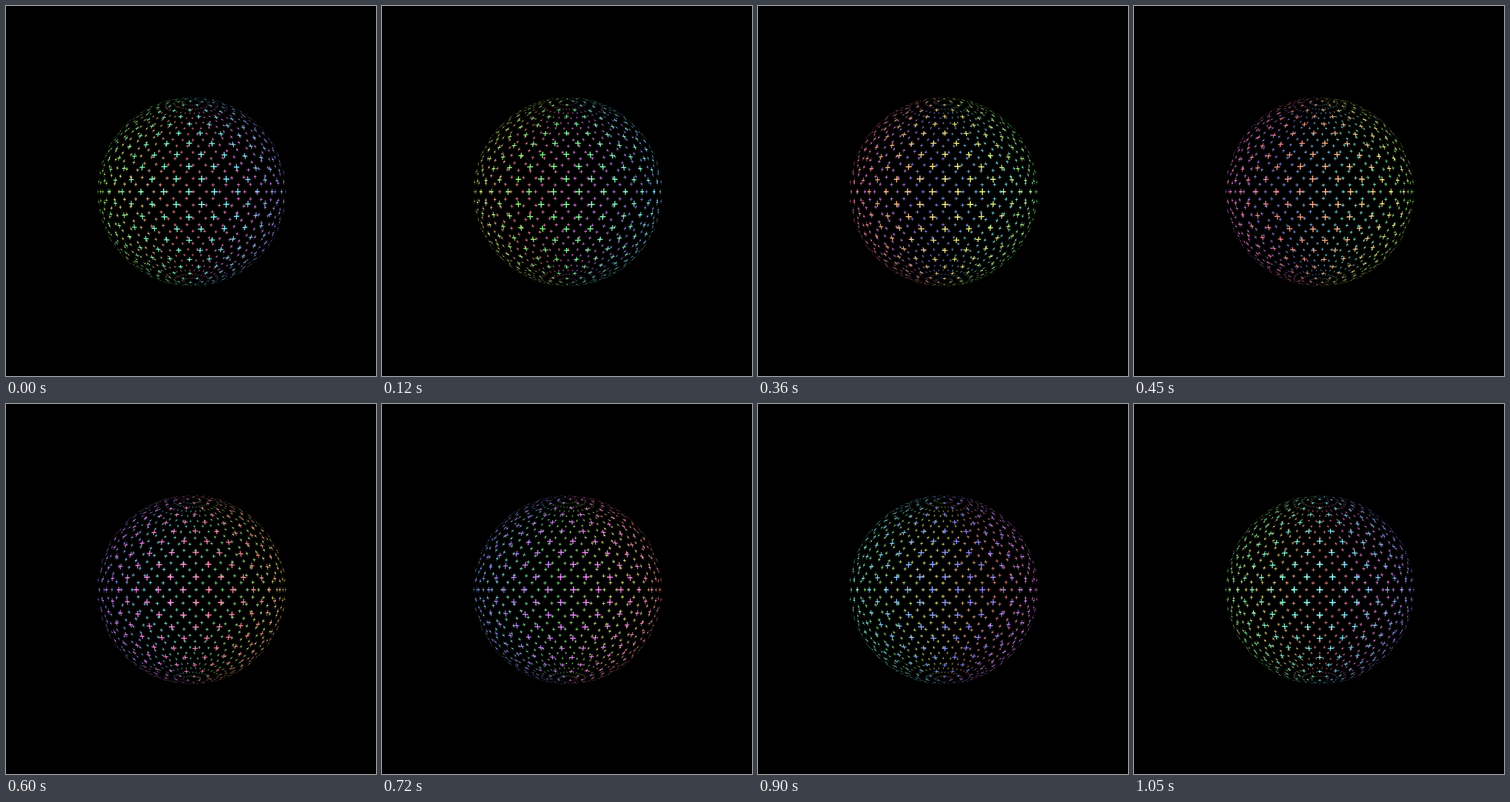
These frames come from a looping animation (500x500 px, 1080 ms). An HTML page with a canvas:

```html
<!DOCTYPE html>
<html lang="en">
<head>
<meta charset="utf-8">
<title>Sphere of crosses</title>
<style>
  html, body { margin: 0; width: 100%; height: 100%; overflow: hidden; background: #000; }
  canvas { display: block; width: 500px; height: 500px; }
</style>
</head>
<body>
<canvas id="stage" width="500" height="500"></canvas>
<script>
const ctx = document.getElementById('stage').getContext('2d');

const STEP_MS = 30, STEPS = 36;
const CENTER = 251;
const FOCAL = 379.5, DISTANCE = 3.137;   // camera, in units of the sphere radius
const COLUMNS = 32, TOP_ROW = 15;
const GAP = 2 * Math.PI / COLUMNS;       // longitude between crosses in a row
const ARM = 0.0255, HALF = 0.0043;       // arm length and half thickness, radians

// Outline of a plus sign as [longitude, latitude] offsets
const PLUS = [
  [-HALF, -ARM], [HALF, -ARM], [HALF, -HALF], [ARM, -HALF],
  [ARM, HALF], [HALF, HALF], [HALF, ARM], [-HALF, ARM],
  [-HALF, HALF], [-ARM, HALF], [-ARM, -HALF], [-HALF, -HALF]
];

function project(lon, lat) {
  const ring = Math.cos(lat);
  const scale = FOCAL / (DISTANCE - ring * Math.cos(lon));
  return [CENTER + scale * ring * Math.sin(lon), CENTER + scale * Math.sin(lat)];
}

function drawCross(lon, lat, hue) {
  ctx.fillStyle = `hsl(${hue}, 100%, 77%)`;
  ctx.beginPath();
  for (const [dLon, dLat] of PLUS) ctx.lineTo(...project(lon + dLon, lat + dLat));
  ctx.closePath();
  ctx.fill();
}

function draw(step) {
  ctx.fillStyle = '#000';
  ctx.fillRect(0, 0, 500, 500);
  const turn = (step + 1) / 9;           // columns moved to the left
  const frontHue = 180 - 10 * (step + 1);
  const crosses = [];
  for (let row = -TOP_ROW; row <= TOP_ROW; row++) {
    const lat = row * GAP / 2;
    const offset = row % 2 ? 0.5 : 0;
    for (let col = 0; col < COLUMNS; col++) {
      const lon = (col + offset - turn) * GAP;
      crosses.push({ lon, lat, depth: Math.cos(lat) * Math.cos(lon) });
    }
  }
  crosses.sort((a, b) => a.depth - b.depth);
  for (const { lon, lat } of crosses) {
    const hue = frontHue + lon * 180 / Math.PI;
    drawCross(lon, lat, ((hue % 360) + 360) % 360);
  }
}

const start = performance.now();
let shown = -1;

function tick() {
  const step = Math.floor((performance.now() - start) / STEP_MS) % STEPS;
  if (step !== shown) draw(shown = step);
  requestAnimationFrame(tick);
}
tick();
</script>
</body>
</html>
```
